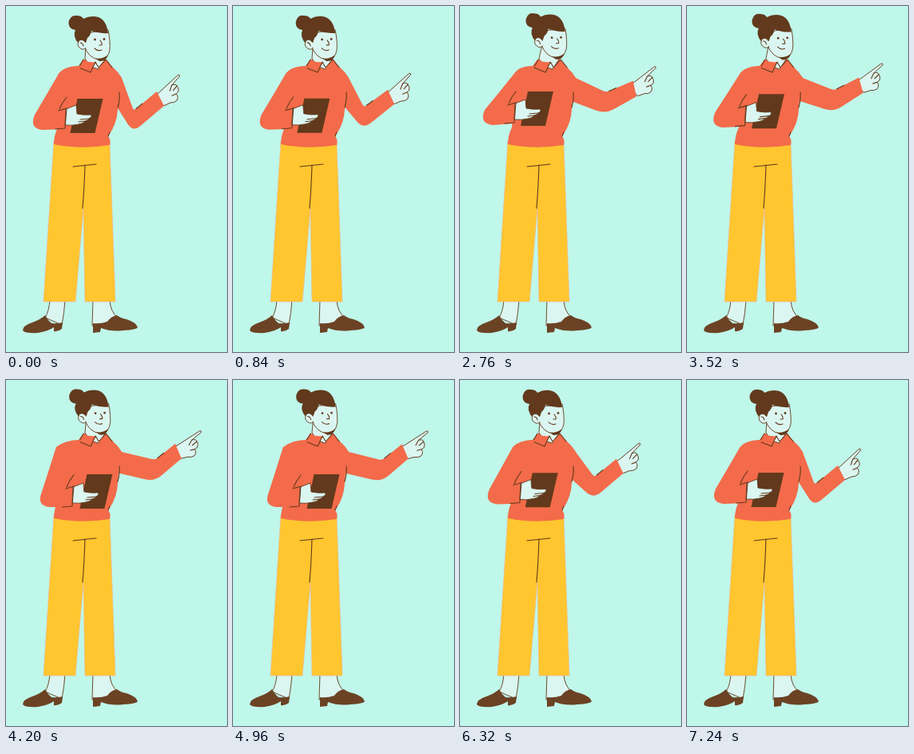
Animation of 277x433 px, one loop 7.28 s. Source, as an HTML page:

```html
<!DOCTYPE html>
<html lang="en">
<head>
<meta charset="utf-8">
<title>Pointing presenter</title>
<style>
  html, body { margin: 0; width: 100%; height: 100%; overflow: hidden; background: #bff7ea; }
  svg { display: block; width: 277px; height: 433px; }
  .skin { fill: #dbf6f1; stroke: #62391c; stroke-width: .9; stroke-linejoin: round; }
  .red { fill: #f36b4a; }
  .brown { fill: #62391c; }
  .shoe { fill: #6c4224; }
  .line { fill: none; stroke: #62391c; stroke-width: 1.1; stroke-linecap: round; stroke-linejoin: round; }
</style>
</head>
<body>
<svg viewBox="0 0 277 433">
  <!-- feet and trousers -->
  <path class="skin" d="M55 368Q54 382 49 390L70 399Q73 384 74 368ZM109 368L108 400L128 402L140 390Q131 383 130 368Z"/>
  <path class="shoe" d="M49 387Q44 392 33 396Q21 400 21 406Q24 410 40 409Q53 407 60 402L60 407Q65 408 70 404L71 396Q63 398 57 397Q52 393 49 387ZM109 397L109 409L118 408L119 403Q132 408 147 406Q164 405 165 402Q163 396 151 392Q144 391 139 387Q132 388 127 395Q118 398 109 397Z"/>
  <path fill="#ffc62f" stroke="#f0b890" stroke-width=".7" d="M60 169L47 370H87L97 253L99 370H137L130 172Z"/>
  <path class="line" d="M84 201L113 198M99 199Q98 230 96 253"/>

  <!-- pointing arm -->
  <g id="hand">
    <path class="skin" d="M-3 -8L6 -6L37 -1.5Q39 0 37 1L22 .5Q27 3 25.5 6Q25 10 21 12L17 11.5Q17 16 11.5 17.5Q7 17 4 13L-4 9Z"/>
    <path class="line" d="M22 .5L15 3M25.5 6L18 6M17 11.5L12 9"/>
  </g>
  <path id="arm" class="red"/>
  <path id="fold" class="line"/>

  <!-- torso and head -->
  <path class="red" d="M97 67L91 75Q76 77 70 84L68 120L65 152Q60 162 60 173Q93 180 130 174Q132 168 128 163Q139 148 140 130L142 106L145 90Q140 82 133 76L126 67Z"/>
  <path class="line" d="M142 108Q143 118 140 127M130 158L128 163"/>
  <path id="neck" class="skin"/>
  <g id="head">
    <path class="skin" d="M98 34L98 50Q104 66 117 67Q128 67 130 55Q131 45 128 30Z"/>
    <path class="brown" d="M112 65.5Q121 67 128 61Q125 70 117 69Z"/>
    <path class="brown" d="M87 30Q78 29 78.500 20Q81 11 88 12Q95 12 97 16Q106 11 116 14Q126 18 128 34Q117 35 107 31Q106 37 102 40L100 46L91 47Q83 38 87 30Z"/>
    <path class="skin" d="M99 45Q95 40 91 44Q88 51 95 54Q99 55 100 52"/>
    <path class="line" d="M93 46Q96 46 97 50M118 43Q121 47 120 49L117 49M111 53Q115 57 120 55"/>
    <circle class="brown" cx="111.500" cy="42" r="1.400"/>
    <circle class="brown" cx="123" cy="41.500" r="1.400"/>
  </g>
  <g id="collar">
    <path class="red" d="M97 67L91 77L106 83L112 70Q103 71 97 67ZM125 67L116 77L118 80L133 77Z"/>
    <path class="line" d="M97 67L91 77L106 83L112 70L116 77L125 67L133 77"/>
  </g>

  <!-- arm with folder -->
  <path id="sleeve" class="red"/>
  <path id="folder" class="brown" d="M0 0H32L22 43H-9Z"/>
  <g id="grip">
    <path class="skin" d="M0 1Q8 -2 13 -4L14 7Q24 9 31 8Q34 10 29 13Q28 15 24 16Q22 19 16 20Q8 22 -1 21Z"/>
    <path class="line" d="M29 13L18 14M24 16L16 17"/>
  </g>
  <path id="creases" class="line"/>
</svg>
<script>
const LOOP = 7280;
const set = (id, name, value) => document.getElementById(id).setAttribute(name, value);

const rest = {
  elbow: [159, 158], cuff: [193.5, 116], turn: [-27, -51],
  bend: [34, 144], wrist: [75, 128], folder: [89.5, 116], head: [0, 0]
};
const raised = {
  elbow: [182, 135], cuff: [219, 103.5], turn: [-12, -46],
  bend: [29, 138], wrist: [69, 121], folder: [85, 107], head: [3.2, -2.4]
};
const extended = {
  elbow: [186, 127], cuff: [216, 89], turn: [-23, -41],
  bend: [43, 148], wrist: [84, 133], folder: [101.5, 118], head: [.5, -.4]
};

function ramp(t, start, end) {
  const u = Math.min(1, Math.max(0, (t - start) / (end - start)));
  return u * u * (3 - 2 * u);
}

// Every part goes rest > raised > extended > rest
function travel(part, up, out, back) {
  return rest[part].map((home, i) => {
    const high = home + (raised[part][i] - home) * up;
    const far = high + (extended[part][i] - high) * out;
    return far + (home - far) * back;
  });
}

const toward = ([x, y], [tx, ty], d) => {
  const k = d / Math.hypot(tx - x, ty - y);
  return [x + (tx - x) * k, y + (ty - y) * k];
};

function drawPointing(t, out) {
  const at = part => travel(part, ramp(t, 300, 2300), out, ramp(t, 4800, 7200));
  const outer = at('elbow'), [cx, cy] = at('cuff'), [tilt, aim] = at('turn');
  const inner = [outer[0] + 1, outer[1] - 27], shoulder = [145, 90];
  const pit = [140, 70 + outer[1] * .365];
  const r = tilt * Math.PI / 180, dx = -Math.sin(r) * 10, dy = Math.cos(r) * 10;
  const top = [cx - dx, cy - dy], low = [cx + dx, cy + dy];
  const bend = toward(inner, top, 4);
  set('arm', 'd', `M126 70L133 76Q140 82 ${shoulder}L${toward(inner, shoulder, 4)}Q${inner} ${bend}
    L${top}L${low}L${toward(outer, low, 12)}Q${outer} ${toward(outer, pit, 12)}L${pit}L124 110Z`);
  set('fold', 'd', `M${bend}L${toward(inner, top, 14)}`);
  set('hand', 'transform', `translate(${cx} ${cy}) rotate(${aim})`);
}

function drawHolding(at) {
  const [ex, ey] = at('bend'), [wx, wy] = at('wrist'), sx = 80 - ex * .4;
  set('sleeve', 'd', `M93 75Q74 75 ${sx} 84Q${(sx + ex) / 2 + 1} ${(77 + ey) / 2} ${ex + 2} ${ey - 8}
    C${ex - 3} ${ey + 4} ${ex + 1} ${ey + 10} ${ex + 12} ${ey + 11}
    L${wx - 1} ${wy + 26}L${wx + 1} ${wy}L${wx + 3} ${wy - 14}L92 100Z`);
  set('creases', 'd', `M${wx + 1} ${wy - 14}Q${wx - 4} ${wy - 8} ${wx - 8} ${wy + 1}
    M${wx - 9} ${wy + 3}L${wx + 1} ${wy}L${wx - 1} ${wy + 25}L${wx - 13} ${wy + 26}`);
  set('folder', 'transform', `translate(${at('folder')})`);
  set('grip', 'transform', `translate(${wx} ${wy})`);
}

function drawHead(at) {
  const [x, y] = at('head');
  set('head', 'transform', `translate(${x} ${y}) rotate(${x * .3} 110 66)`);
  set('collar', 'transform', `translate(${x * .4} 0)`);
  set('neck', 'd', `M${100 + x} ${50 + y}L99 66L106 76L116 79L124 67L${118 + x} ${62 + y}Z`);
}

function frame(now) {
  const t = now % LOOP;
  const out = ramp(t, 3100, 4250);
  const at = part => travel(part, ramp(t, 700, 1900), out, ramp(t, 5200, 6600));
  drawPointing(t, out);
  drawHolding(at);
  drawHead(at);
  requestAnimationFrame(frame);
}
frame(0);
</script>
</body>
</html>
```
